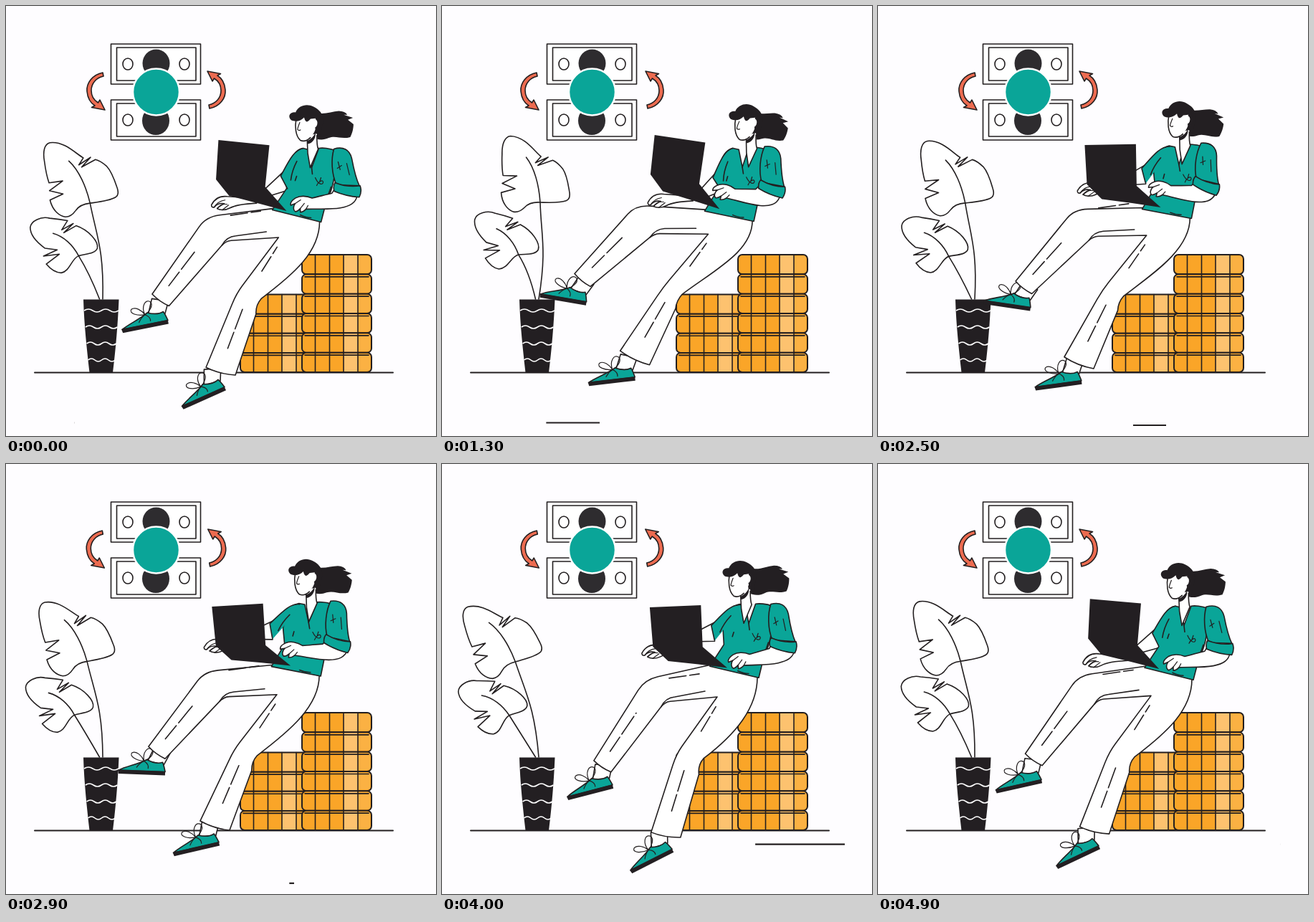
An HTML page that plays this animation: 600x600 px, repeating every 5 s.

```html
<!DOCTYPE html>
<html lang="en">
<head>
<meta charset="utf-8">
<title>Working on the coins</title>
<style>
html, body { margin: 0; width: 100%; height: 100%; overflow: hidden; background: #fefdff; }
svg { display: block; width: 100vw; height: 100vh; }
.ln { fill: none; stroke: #231f20; stroke-width: 1.6; stroke-linecap: round; stroke-linejoin: round; }
.w { fill: #fff; }
.t { fill: #0aa598; }
.thin { stroke-width: 1.2; }
.dark { fill: #231f22; }
.red { fill: #ec6b50; }
</style>
</head>
<body>
<svg viewBox="0 0 600 600">
  <defs>
    <g id="bill">
      <rect class="ln w" x="146.500" y="53" width="125" height="56"/>
      <rect class="ln" x="154.500" y="58" width="110.500" height="46"/>
      <ellipse class="ln" cx="170" cy="81" rx="7" ry="8"/>
      <ellipse class="ln" cx="249" cy="81" rx="7" ry="8"/>
    </g>
    <path id="arrow" class="ln red" d="M135 93C120 96 112 108 113 119C114 130 119 136 124 139L119.500 141.500L138 145L131 131L128.500 135C122 131 119 126 119 118C119 108 126 100 136 98Z"/>
    <g id="shoe">
      <path class="ln w" d="M-25 -18L-16 -38L6 -30L-2 -14Z"/>
      <path class="ln t" d="M-65 -4C-54 -10 -38 -13 -26 -20C-20 -17 -12 -14 -4 -17C-2 -13 -1 -8 0 -4Z"/>
      <path class="dark" d="M-66 -4.500L0 -4.500L0 1L-65 1Z"/>
      <g class="ln thin">
        <path d="M-30 -18C-40 -18 -52 -24 -47 -29C-41 -32 -33 -25 -30 -18C-33 -30 -25 -40 -19 -34C-15 -28 -24 -20 -30 -18"/>
        <path d="M-30 -18C-36 -15 -38 -12 -40 -9M-30 -18C-25 -15 -23 -12 -24 -8"/>
      </g>
    </g>
  </defs>

  <path class="ln" style="stroke-width:2" d="M40 511.500H540"/>

  <use href="#bill"/>
  <use href="#bill" y="78"/>
  <ellipse cx="209.500" cy="80" rx="19" ry="19.500" fill="#2e2c2f"/>
  <ellipse cx="209" cy="160" rx="19" ry="20" fill="#2e2c2f"/>
  <circle class="t" cx="209.500" cy="120" r="32.500" stroke="#fff" stroke-width="2.500"/>
  <use id="arrowL" href="#arrow"/>
  <use id="arrowR" href="#arrow"/>

  <g id="coins"></g>

  <path id="stem1" class="ln"/>
  <g id="leaf1">
    <path class="ln w" d="M60 190C52 192 50 203 53 217C55 230 57 238 60 246L79 243L61 257L80 261L62 270C66 285 76 292 84 293C92 293 96 287 98 284C103 276 110 274 118 273C130 271 145 269 153 264C158 261 157 255 155 250C150 236 145 226 140 221C134 216 129 213 124 212L105 223L117 209L101 220L107 210C97 205 80 187 60 190Z"/>
    <path class="ln" d="M87 215C101 227 112 250 118 273"/>
  </g>
  <path id="stem2" class="ln"/>
  <g id="leaf2">
    <path class="ln w" d="M62 296C50 293 36 300 35 309C35 320 46 331 56 338L73 340L54 349L76 346L58 360C64 367 72 372 79 372C91 370 93 352 103 348C113 345 126 345 129 337C131 328 117 312 99 306L82 316L95 303L79 312L87 299Q75 297 62 296Z"/>
    <path class="ln" d="M67 317C82 321 95 333 103 348"/>
  </g>

  <path class="dark" d="M108 409.500H157.500C156 445 153 480 149 511.500H116.500C113 480 109 445 108 409.500Z"/>
  <g id="waves" fill="none" stroke="#fff" stroke-width="1.600"></g>

  <path id="dash" class="ln" style="stroke-width:2.2;stroke-linecap:butt"/>

  <use id="shoeB" href="#shoe"/>
  <use id="shoeF" href="#shoe"/>
  <path id="pants" class="ln w"/>
  <path id="folds" class="ln"/>
  <path id="seams" class="ln" stroke-dasharray="24 5 30 5 7 5"/>

  <g class="torso">
    <g class="backArm">
      <path class="ln w" d="M384 232L356 257L359 266L391 257Z"/>
    </g>
    <path class="ln t" d="M413 199C400 201 396 215 389 232L390 255L370 285L438 302L446 271C456 255 460 225 458 202C450 199 440 198 435 199L425 226L421 201Z"/>
    <g class="backArm">
      <path class="t" d="M414 200C400 201 392 218 381 237L391 256L404 228Z"/>
      <path class="ln" d="M413 199C400 201 392 218 381 237L390 255M404 217C399 226 396 236 395 243"/>
    </g>
    <g class="ln">
      <path d="M404 238L402 244M425 226L426 235M409 292C415 295 420 296 424 296M452 253C450 260 447 266 445 271"/>
      <path class="thin" d="M430 240C434 250 441 251 441 246C440 242 434 246 432 251M438 240L436 246"/>
    </g>
  </g>

  <g id="hair">
    <path class="dark" d="M424 144C438 156 452 147 465 146Q474 146 477 151L472 151L485 155L478 158L486 164C486 172 484 178 482 182C470 186 462 180 452 184C444 188 436 187 430 184Z"/>
  </g>
  <g id="head">
    <path class="w" d="M421 182L421 205L425 226L436 200L434 178Z"/>
    <path class="ln" d="M420.500 186L421.500 206L425 226L436 200C434 195 434 188 434 181"/>
    <path class="w" d="M405 158C403 168 404 182 411 188C419 191 428 184 432 172L433 156L420 150Z"/>
    <path class="ln" d="M405 158C403 168 404 182 411 188C416 190 421 188 425 184"/>
    <path class="dark" d="M420 189C426 186 430 182 432 177C433 185 428 192 421 193Z"/>
    <path class="ln thin" d="M410 163C408 168 407 171 407 173Q409 175 411 173.500"/>
    <path class="dark" d="M398 160C392 154 397 148 404 149C408 139 420 136 429 141C437 145 442 150 443 160L438 184L433 178L431 168L432 157L425 158C421 163 418 164 416 156C411 161 405 163 398 160Z"/>
    <path class="w" d="M426 164C427 156 435 157 434.500 164C434 169 431 171 428 170Z"/>
  </g>

  <g id="hand">
    <path class="ln w" d="M289 280C294 270 302 267 311 268L345 270L352 277C335 278 322 280 315 284C308 288 300 287 297 285C301 281 304 279 307 278C301 277 296 279 293 283Q289 284 289 280Z"/>
    <path class="ln thin" d="M293 283C297 276 302 274 308 273M297 285C301 280 306 278 311 279M304 287L313 280"/>
  </g>

  <g id="laptop">
    <path class="dark" d="M297 186L368 194L361.500 252L391 286L352 275L311 264L293 241Z"/>
  </g>

  <g id="forearm">
    <path class="ln w" d="M460 256L456 262C446 264 438 266 428 268C420 264 411 264 405 267C400 270 397 274 398 277L404 275C401 279 401 284 404 286C407 286 409 284 411 282L411 287Q415 287 419 283C436 283 452 285 467 283C480 281 489 277 491 266L488 256Z"/>
    <path class="ln thin" d="M404 275L412 270M411 282L417 275M419 283L422 278"/>
  </g>
  <g class="torso">
    <g id="sleeve">
      <path class="ln t" d="M456 200C469 196 478 201 481 213C484 228 487 241 492 251L460 250C453 235 452 214 456 200Z"/>
      <path class="ln t" d="M458 247Q476 254 493 251Q496 259 492 267Q474 266 457 259Q455 252 458 247Z"/>
      <path class="ln thin" d="M462 218L465 229M461 227L467 223M474 220L478 236"/>
    </g>
  </g>
</svg>

<script>
const LOOP = 5000, STEP = 100, LEG_LAG = 1600;
const $ = id => document.getElementById(id);

// Every joint sways once per loop; lag is the moment it rests at its first pose
const sway = (t, a, b, lag) => a + (b - a) * (1 - Math.cos((t - lag) / LOOP * 2 * Math.PI)) / 2;

// pin: pivot in the drawing; a, b: extreme poses as x, y, angle; lag: one for each
const parts = {
  leaf1: { pin: [118, 273], a: [137, 274, 11], b: [102, 276, -6], lag: [1350, 1350, 1350] },
  leaf2: { pin: [103, 348], a: [107, 347, 9], b: [93, 351, -5], lag: [1100, 1100, 1400] },
  laptop: { pin: [391, 286], a: [387, 281, 3], b: [399, 286, -11], lag: [1050, 2450, 850] },
  head: { pin: [420, 185], a: [424, 179, 2], b: [416, 185, 0], lag: [1300, 2950, 1700] },
  hair: { pin: [432, 160], a: [429, 154, 9], b: [431, 160, -1], lag: [2500, 2950, 1650] },
  hand: { pin: [300, 278], a: [300, 278, 0], b: [287, 254, 3], lag: [700, 500, 600] },
  forearm: { pin: [482, 272], a: [457, 264, 15], b: [485, 272, -5], lag: [1900, 3250, 1850] },
  sleeve: { pin: [465, 205], a: [465, 205, 16], b: [465, 205, 0], lag: [0, 0, 2200] },
  shoeB: { pin: [0, 0], a: [200, 415, 13], b: [239, 452, -16], lag: [1550, 1650, 1850] },
  shoeF: { pin: [0, 0], a: [268, 521, -4], b: [323, 541, -28], lag: [1580, 1600, 1850] }
};
const torso = { pin: [438, 302], a: [435, 296, -3.5], b: [442, 302, 0], lag: [1500, 2950, 2300] };
const backArm = { pin: [410, 202], a: [410, 202, -7], b: [410, 202, 21], lag: [0, 0, 750] };
const joints = {
  hemB1: [[184, 372], [212, 414]],
  hemB2: [[206, 390], [236, 430]],
  kneeB: [[270, 277], [283, 301]],
  pitB: [[296, 317], [311, 332]],
  crotch: [[371, 318], [384, 325]],
  hemF1: [[247, 480], [292, 514]],
  hemF2: [[288, 500], [333, 521]],
  kneeF1: [[308, 392], [327, 405]],
  kneeF2: [[334, 402], [365, 411]]
};

const pose = (p, t) => p.a.map((v, i) => sway(t, v, p.b[i], p.lag[i]));
const mix = (a, b, k) => [a[0] + (b[0] - a[0]) * k, a[1] + (b[1] - a[1]) * k];
const off = (p, x, y) => [p[0] + x, p[1] + y];
const turn = ([x, y], deg) => {
  const r = deg * Math.PI / 180, c = Math.cos(r), s = Math.sin(r);
  return [x * c - y * s, x * s + y * c];
};
const path = (...bits) => bits.map(b => Array.isArray(b) ? b.map(v => v.toFixed(2)).join(' ') : b).join(' ');
const place = (el, [x, y, a], [px, py]) =>
  el.setAttribute('transform', `translate(${x} ${y}) rotate(${a}) translate(${-px} ${-py})`);
const each = (sel, fn) => document.querySelectorAll(sel).forEach(fn);
const smooth = v => { v = Math.min(1, Math.max(0, v)); return v * v * (3 - 2 * v); };

function stack(x, top, count) {
  let out = '';
  const h = (511 - top) / count;
  for (let i = 0; i < count; i++) {
    const y = top + i * h;
    out += `<rect x="${x}" y="${y}" width="97" height="${h}" rx="6" fill="#faa528"/>
      <rect x="${x + 58}" y="${y}" width="20" height="${h}" fill="#fdc26f"/>
      <rect x="${x + 78}" y="${y + 2}" width="17" height="${h - 4}" fill="#fbb143"/>
      <path class="ln" d="${[18.5, 38.5, 58, 78].map(v => `M${x + v} ${y}v${h}`).join('')}"/>
      <rect class="ln" style="stroke-width:2" x="${x}" y="${y}" width="97" height="${h}" rx="6"/>`;
    if (i) out += `<path class="ln" d="M${x + 4} ${y + 3.5}h89"/>`;
  }
  return out;
}
$('coins').innerHTML = stack(327, 402.5, 4) + stack(413, 347, 6);
$('waves').innerHTML = [0, 1, 2, 3].map(i => {
  const x = 109 + i * 1.8, y = 424 + i * 23, q = (157 - i * 1.5 - x) / 4;
  return `<path d="M${x} ${y + 1}q${q / 2} -4 ${q} 0t${q} 0t${q} 0t${q} 0"/>`;
}).join('');

// A line grows from its left end, then shrinks towards its right end
const dashes = [
  { start: -20, dur: 1840, x: 95, len: 125, y: 581.5 },
  { start: 1860, dur: 1180, x: 355, len: 47, y: 585 },
  { start: 3060, dur: 1850, x: 437, len: 125, y: 530.7 }
];

function drawDash(t) {
  let d = '';
  for (const { start, dur, x, len, y } of dashes) {
    const u = (t - start) / dur;
    if (u > 0 && u < 1) d += `M${x + len * smooth(2 * u - 1)} ${y}H${x + len * smooth(2 * u)}`;
  }
  $('dash').setAttribute('d', d);
}

function drawStems(a, b) {
  const base = [135, 409], p = turn([10, 45], a[2]);
  $('stem1').setAttribute('d', path('M', a.slice(0, 2), 'C', off(a, p[0], p[1]),
    off(base, (a[0] - 118) * .5 + 2, -70), base));
  $('stem2').setAttribute('d', path('M', b.slice(0, 2), 'Q', off(b, 15, 24), [130.5, 409]));
}

function drawLegs(t, body) {
  const p = {};
  for (const k in joints) {
    const [a, b] = joints[k];
    p[k] = a.map((v, i) => sway(t, v, b[i], LEG_LAG));
  }
  const at = (x, y) => off(body, ...turn([x, y], body[2]));
  const hipL = at(-67, -19), hipR = at(-2, -1);
  const hem = (a, b, y) => off(mix(a, b, .5), -2, y);
  $('pants').setAttribute('d', path('M', p.hemB1, 'L', mix(p.kneeB, p.hemB1, .13), 'Q', p.kneeB,
    mix(p.kneeB, hipL, .2), 'L', hipL, 'L', hipR,
    'C', off(hipR, 0, 43), off(p.kneeF2, 45, -34), p.kneeF2,
    'Q', off(p.kneeF2, -8, 9), mix(p.kneeF2, p.hemF2, .2), 'L', p.hemF2,
    'Q', hem(p.hemF1, p.hemF2, 4), p.hemF1, 'L', mix(p.kneeF1, p.hemF1, .14),
    'Q', p.kneeF1, mix(p.kneeF1, p.crotch, .14), 'L', p.crotch,
    'L', mix(p.pitB, p.crotch, .1), 'Q', p.pitB, mix(p.pitB, p.hemB2, .08),
    'L', p.hemB2, 'Q', hem(p.hemB1, p.hemB2, 2), p.hemB1, 'Z'));
  $('folds').setAttribute('d', path('M', mix(p.pitB, p.hemB2, .07), 'Q', off(p.pitB, 1, -6),
    off(p.pitB, 14, -7), 'L', off(p.crotch, -17, -8)));
  const b1 = mix(p.hemB1, p.hemB2, .4), b2 = mix(p.kneeB, p.pitB, .4);
  const f1 = mix(p.hemF1, p.hemF2, .45), f2 = mix(p.kneeF1, p.kneeF2, .45);
  const line = (a, b) => path('M', a, 'L', b);
  $('seams').setAttribute('d', [
    line(mix(b1, b2, .18), mix(b1, b2, .68)),
    line(mix(f1, f2, .3), mix(f1, f2, .82)),
    line(off(mix(p.kneeF1, p.crotch, .45), 9, 4), off(mix(p.kneeF1, p.crotch, .88), 5, 4)),
    line(off(p.kneeB, 34, -2), off(p.kneeB, 76, -8))
  ].join(''));
}

function draw(t) {
  for (const k in parts) place($(k), pose(parts[k], t), parts[k].pin);
  const body = pose(torso, t), arm = pose(backArm, t);
  each('.torso', el => place(el, body, torso.pin));
  each('.backArm', el => place(el, arm, backArm.pin));
  drawStems(pose(parts.leaf1, t), pose(parts.leaf2, t));
  drawLegs(t, body);
  drawDash(t);
  const out = 1.5 * (1 - Math.cos(t / LOOP * 4 * Math.PI));
  $('arrowL').setAttribute('transform', `translate(${-out} 0)`);
  $('arrowR').setAttribute('transform', `translate(${419 + out} 236) rotate(180)`);
}

const began = performance.now();
function tick() {
  const t = Math.max(0, performance.now() - began) % LOOP;
  draw(Math.floor(t / STEP) * STEP);
  requestAnimationFrame(tick);
}
tick();
</script>
</body>
</html>
```
